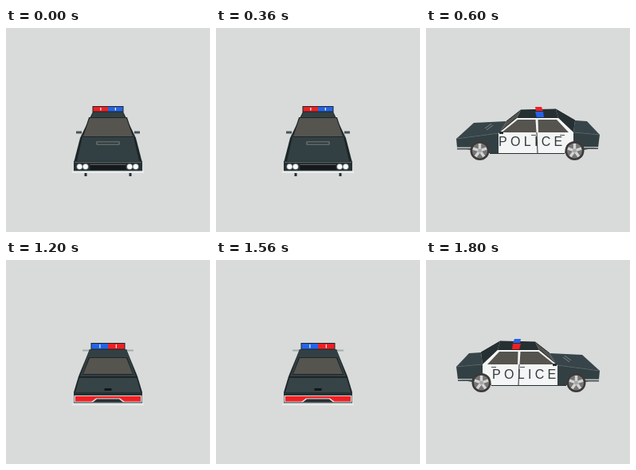
An HTML page with a canvas for the animation above (2.4 s loop, 256 by 256 pixels).

```html
<!DOCTYPE html>
<html>
<head>
<meta charset="utf-8">
<style>
html, body { margin: 0; width: 100%; height: 100%; overflow: hidden; background: #d8dbda; }
canvas { display: block; width: 100vw; height: 100vh; }
</style>
</head>
<body>
<canvas id="stage" width="256" height="256"></canvas>
<script>
const ctx = document.getElementById('stage').getContext('2d');
const STEP = 600, MID = 128;
const BODY = '#334043', DARK = '#263033', EDGE = '#1d2527', GLASS = '#55544f',
      WHITE = '#f4f5f5', SILVER = '#b9bfc1', RED = '#f02024', BLUE = '#2464e8';

function trace(points) {
  ctx.beginPath();
  for (const [x, y] of points) ctx.lineTo(x, y);
}
function face(color, ...points) {
  trace(points);
  ctx.fillStyle = color;
  ctx.fill();
}
function line(color, width, ...points) {
  trace(points);
  ctx.strokeStyle = color;
  ctx.lineWidth = width;
  ctx.stroke();
}
function rect(color, x, y, w, h) {
  ctx.fillStyle = color;
  ctx.fillRect(x, y, w, h);
}
function disc(color, x, y, r) {
  ctx.fillStyle = color;
  ctx.beginPath();
  ctx.arc(x, y, r, 0, 7);
  ctx.fill();
}

// Centred shapes for the end views, given by half widths.
function trapezoid(color, top, y1, bottom, y2) {
  face(color, [MID - top, y1], [MID + top, y1], [MID + bottom, y2], [MID - bottom, y2]);
}
function band(color, half, y, h) {
  rect(color, MID - half, y, half * 2, h);
}
function pane(top, y1, bottom, y2) {
  trapezoid(EDGE, top + 1, y1 - 1, bottom + 1, y2 + 1);
  trapezoid(GLASS, top, y1, bottom, y2);
}
function lightBar(half, y, h, left, right) {
  band(EDGE, half + 1, y - 1, h + 2);
  rect(left, MID - half, y, half, h);
  rect(right, MID, y, half, h);
  for (const x of [MID - half / 2, MID + half / 2]) rect(WHITE, x - .5, y + 1, 1.2, h - 2);
}

function front() {
  for (const side of [-1, 1]) {
    rect(DARK, MID + side * 28 - 1.5, 178, 3, 8);
    rect('#4b5457', MID + side * 36.5 - 3.5, 129.5, 7, 3);
  }
  band('#eceeee', 45, 179.5, 2.5);
  trapezoid(EDGE, 19, 105, 35, 138);
  trapezoid(EDGE, 35, 138, 43, 169);
  trapezoid(BODY, 18, 105, 33, 137);
  trapezoid(BODY, 32, 137, 39, 167);
  pane(23, 113, 31, 136);
  band('#7e8582', 14.5, 142.5, 4);
  band(DARK, 13.5, 143.5, 2);
  band(DARK, 43, 167, 13);
  band('#596266', 42, 168, 1);
  band('#15191b', 22.5, 171, 7);
  band('#687174', 22.5, 171, .8);
  for (const offset of [-35.7, -28.2, 27.2, 34.8]) {
    disc('#8d9799', MID + offset, 174, 3.8);
    disc('#fff', MID + offset, 174, 3);
  }
  band('#a5abae', 43, 179, 1);
  lightBar(18.5, 99, 5.5, RED, BLUE);
}

function back() {
  band('#e7e9e9', 45, 180, 2.5);
  band('#a5abad', 32, 112.5, 2);
  trapezoid(EDGE, 23, 112, 37, 146);
  trapezoid(EDGE, 37, 146, 43, 166);
  trapezoid(BODY, 23, 112, 35, 146);
  trapezoid('#364347', 36, 148, 41, 166);
  pane(23, 123, 31, 143);
  band('#111618', 4.5, 161, 3);
  band(DARK, 43, 166, 14);
  band('#d5d8d9', 42.5, 170, 8.5);
  band(RED, 41, 171, 6.5);
  trapezoid('#e2e4e4', 15, 173.5, 21, 178);
  trapezoid(DARK, 14, 174.5, 19, 178.5);
  band('#8d9597', 43, 179, 1);
  lightBar(20.5, 105, 6.5, BLUE, RED);
}

function wheel(x, y) {
  disc('#3b3938', x, y, 12);
  disc('#777675', x, y, 9.5);
  for (let i = 0; i < 5; i++) {
    const a = (i * .4 - .5) * Math.PI;
    line('#d3d5d5', 3.4, [x, y], [x + 9 * Math.cos(a), y + 9 * Math.sin(a)]);
  }
  disc('#a5a8a8', x, y, 2.5);
}

// Corners of the body, nose to the left.
const nose = [38, 139], noseFar = [60, 119], noseLow = [39, 150],
      cowl = [92, 132], cowlFar = [101, 117], roofFront = [114, 113], roofFrontFar = [119, 103],
      roofBack = [166, 113], roofBackFar = [163, 102], deck = [185, 131], deckFar = [187, 116],
      tailFar = [202, 117], tail = [218, 134], tailLow = [216, 150];

function side(topLight, lowLight) {
  face(BODY, nose, cowl, deck, tail, tailLow, [174, 157], [80, 157], noseLow);
  face('#37454a', nose, noseFar, cowlFar, cowl);
  face('#37454a', deck, deckFar, tailFar, tail);
  face(GLASS, cowl, cowlFar, roofFrontFar, roofFront);
  face(DARK, roofBack, roofBackFar, deckFar, deck);
  face(DARK, roofFront, roofFrontFar, roofBackFar, roofBack);
  line(EDGE, 1, cowlFar, roofFrontFar, roofBackFar, deckFar);
  line(EDGE, 2, cowl, roofFront);
  line('#526064', .7, nose, cowl);
  line('#526064', .7, deck, tail);
  for (const shift of [0, 2]) line('#8d9594', .8, [74 + shift, 126 + shift], [82 + shift, 120 + shift]);

  face(WHITE, [91, 132], roofFront, roofBack, deck, [185, 143], [177, 147], [174, 157], [91, 157]);
  face(GLASS, [95, 131], [115, 115], [137.5, 115], [138.5, 131]);
  face(GLASS, [140.5, 115], [164, 115], [179, 131], [141, 131]);
  line(DARK, 1, [139, 131], [140, 157]);
  line(DARK, 1, [80, 157.5], [174, 157.5]);
  rect(DARK, 92, 130, 5, 3);
  for (const x of [132, 168]) rect('#4b5355', x, 134, 6, 1);

  for (const [x, y] of [[39, 149.5], [198, 149]]) {
    rect(SILVER, x, y, 18, 1.5);
    rect('#495154', x, y + 1.5, 18, 1.5);
  }
  wheel(67.5, 154);
  wheel(186.5, 154);
  face(topLight, [137, 99], [145, 99], [147, 104], [138, 104]);
  face(lowLight, [137, 105], [147, 105], [148, 112], [139, 112]);
}

function label(x, y) {
  ctx.font = '16px "Liberation Sans", Arial, sans-serif';
  ctx.letterSpacing = '4.3px';
  ctx.fillStyle = '#343a3c';
  ctx.fillText('POLICE', x, y);
}
function facingLeft() {
  side(RED, BLUE);
  label(91, 147.5);
}
function facingRight() {
  ctx.save();
  ctx.translate(MID * 2, 0);
  ctx.scale(-1, 1);
  side(BLUE, RED);
  ctx.restore();
  label(83, 148.5);
}

const views = [front, facingLeft, back, facingRight];
const start = performance.now();
function tick() {
  rect('#d8dbda', 0, 0, 256, 256);
  views[Math.floor((performance.now() - start) / STEP) % views.length]();
  requestAnimationFrame(tick);
}
tick();
</script>
</body>
</html>
```
